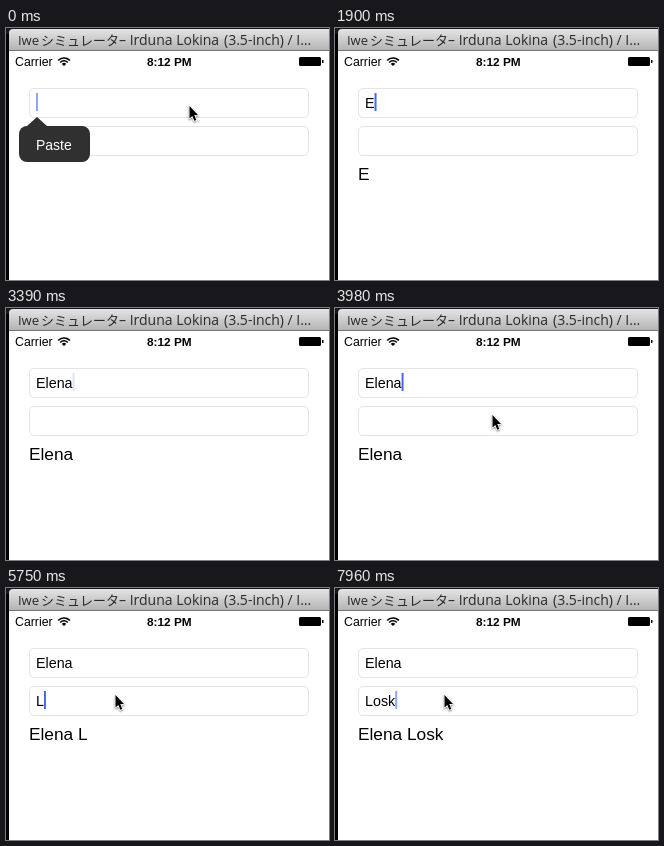
These frames come from a looping animation (323 px wide and 252 px high, 8 s). An HTML page with a canvas:

```html
<!DOCTYPE html>
<html lang="ja">
<head>
<meta charset="utf-8">
<title>Text field demo</title>
<style>
html, body { margin: 0; width: 100%; height: 100%; overflow: hidden; background: #fff; }
canvas { display: block; }
</style>
</head>
<body>
<canvas id="stage" width="323" height="252"></canvas>
<script>
const ctx = document.getElementById('stage').getContext('2d');
const LOOP = 8000;
const TICK = 147.6; // the screen refreshes in steps of this many ms
const LEAD = 24;
const SANS = '"Liberation Sans", Arial, sans-serif';
const TITLE = '"Open Sans", "Noto Sans", sans-serif';
const KANA = '"Noto Sans CJK JP", "Noto Sans CJK", sans-serif';
const FIELD_FONT = 14.3;

// All times below are in ticks.
const first = { word: 'Elena', start: 11, end: 19, power: 1.5, y: 60 };
const last = { word: 'Losk', start: 39, end: 44, power: 1, y: 98 };
const POPUP_CLOSE = 10;
const POINTER_HIDE = 1;
const POINTER_RETURN = 26;
const FOCUS_LAST = 31;
const BLINK = 7;

const clamp = v => Math.min(1, Math.max(0, v));
const easeOut = (p, power) => 1 - (1 - clamp(p)) ** power;
const mix = (a, b, p) => a + (b - a) * p;

function keyTime({ word, start, end, power }, i) {
  return Math.round(mix(start, end, easeOut(i / (word.length - 1), power)));
}

function keysPressed(entry, tick) {
  return [...entry.word].filter((_, i) => keyTime(entry, i) <= tick).length;
}

// The caret stays solid after each key, then fades out and blinks.
function caretAlpha(tick) {
  const resets = [-3, POPUP_CLOSE, FOCUS_LAST];
  for (const entry of [first, last]) {
    for (let i = 0; i < entry.word.length; i++) resets.push(keyTime(entry, i));
  }
  const phase = (tick - Math.max(...resets.filter(r => r <= tick))) % BLINK;
  return clamp(1 - (phase - 2) * .4);
}

function pointerPosition(tick) {
  if (tick < POINTER_HIDE) return [182, 76];
  if (tick < POINTER_RETURN) return null;
  const p = (tick - POINTER_RETURN) / 4;
  return [mix(278, 108, easeOut(p, 4.4)), mix(142, 105, easeOut(p, 16))].map(Math.round);
}

function text(str, x, y, size, color = '#000', family = SANS, weight = '') {
  ctx.font = `${weight} ${size}px ${family}`;
  ctx.fillStyle = color;
  ctx.fillText(str, x, y);
}

function roundRect(x, y, w, h, r) {
  ctx.beginPath();
  ctx.roundRect(x, y, w, h, r);
}

function polygon(points, x = 0, y = 0) {
  ctx.beginPath();
  points.forEach(([px, py]) => ctx.lineTo(x + px, y + py));
  ctx.closePath();
}

function drawTitleBar() {
  ctx.fillStyle = '#15151c';
  ctx.fillRect(0, 0, 323, 6);
  const shade = ctx.createLinearGradient(0, 1, 0, 22);
  shade.addColorStop(0, '#e4e4e4');
  shade.addColorStop(1, '#b4b4b4');
  ctx.fillStyle = shade;
  roundRect(3, 1, 330, 21, [4, 0, 0, 0]);
  ctx.fill();
  ctx.fillStyle = '#747474';
  ctx.fillRect(3, 22, 320, 1);

  const color = '#2a2a2a';
  text('Iwe', 12, 17, 13, color, TITLE);
  text('シミュレータ', 35, 17, 13, color, KANA);
  text('– Irduna Lokina', 113, 17, 14, color, TITLE);
  text('(3.5-inch) / I…', 218, 17, 14, color, TITLE);
}

function drawStatusBar() {
  text('Carrier', 9, 38, 12.3);
  text('8:12 PM', 141, 38, 11.8, '#000', SANS, 'bold');

  const wedge = [-Math.PI * .76, -Math.PI * .24];
  ctx.strokeStyle = '#000';
  ctx.lineWidth = 1.6;
  for (const r of [5.2, 8]) {
    ctx.beginPath();
    ctx.arc(58, 38, r, ...wedge);
    ctx.stroke();
  }
  ctx.fillStyle = '#000';
  ctx.beginPath();
  ctx.moveTo(58, 38);
  ctx.arc(58, 38, 3, ...wedge);
  ctx.fill();

  roundRect(293, 29, 22, 9, 1.5);
  ctx.fill();
  ctx.fillRect(316, 32, 1.5, 3);
}

function drawField(y, str) {
  ctx.strokeStyle = '#e4e4e4';
  ctx.lineWidth = 1;
  roundRect(23.5, y + .5, 279, 29, 4.5);
  ctx.stroke();
  text(str, 30, y + 20, FIELD_FONT);
}

function drawCaret(y, str, alpha) {
  ctx.font = `${FIELD_FONT}px ${SANS}`;
  ctx.globalAlpha = alpha;
  ctx.fillStyle = '#426bf2';
  ctx.fillRect(30 + ctx.measureText(str).width, y + 5, 2, 18);
  ctx.globalAlpha = 1;
}

function drawPopup(alpha) {
  ctx.globalAlpha = alpha;
  ctx.fillStyle = '#303030';
  roundRect(13, 98, 71, 36, 8);
  ctx.fill();
  polygon([[21, 98], [31, 89], [41, 98]]);
  ctx.fill();
  text('Paste', 30, 122, 14, '#fff');
  ctx.globalAlpha = 1;
}

function drawPointer([x, y]) {
  polygon([[1.5, 2], [1.5, 14.5], [4.3, 12], [6.3, 16.8], [8.3, 16], [6.3, 11], [10, 11]], x, y);
  ctx.lineJoin = 'round';
  ctx.lineWidth = 1.6;
  ctx.strokeStyle = '#fff';
  ctx.shadowColor = 'rgba(0,0,0,.5)';
  ctx.shadowBlur = 2;
  ctx.shadowOffsetY = 1;
  ctx.stroke();
  ctx.shadowColor = 'transparent';
  ctx.fillStyle = '#000';
  ctx.fill();
}

function draw(t) {
  const tick = Math.floor((t + LEAD) / TICK);
  const [firstText, lastText] = [first, last].map(e => e.word.slice(0, keysPressed(e, tick)));
  const pointer = pointerPosition(tick);

  ctx.fillStyle = '#fff';
  ctx.fillRect(0, 0, 323, 252);
  ctx.fillStyle = '#000';
  ctx.fillRect(0, 0, 3, 252);
  drawTitleBar();
  drawStatusBar();
  drawField(first.y, firstText);
  drawField(last.y, lastText);
  text(`${firstText} ${lastText}`.trim(), 23, 152, 17.3);
  if (tick < FOCUS_LAST) drawCaret(first.y, firstText, caretAlpha(tick));
  else drawCaret(last.y, lastText, caretAlpha(tick));
  drawPopup(clamp(1 - (tick - POPUP_CLOSE) / 3));
  if (pointer) drawPointer(pointer);
}

const begin = performance.now();
function frame() {
  draw((performance.now() - begin) % LOOP);
  requestAnimationFrame(frame);
}
frame();
</script>
</body>
</html>
```
